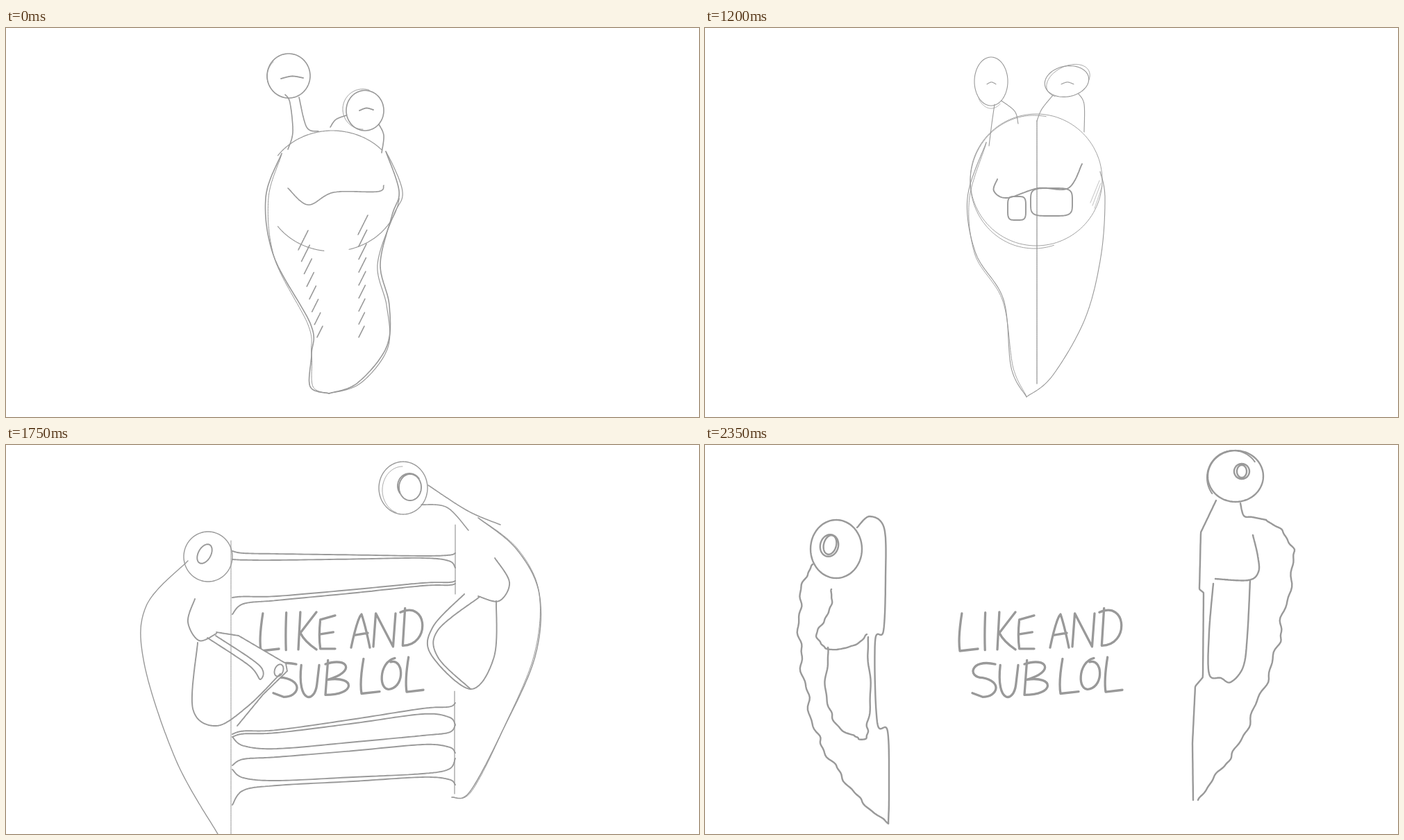
Animation, 998 px wide and 561 px high, one loop 2400 ms. Source, as an HTML page:

```html
<!DOCTYPE html>
<html lang="en">
<head>
<meta charset="utf-8">
<title>Slug sketch</title>
<style>
html, body { margin: 0; width: 100%; height: 100%; overflow: hidden; background: #fff; }
svg { display: block; width: 100vw; height: 100vh; }
g { fill: none; stroke: #999; stroke-linecap: round; stroke-linejoin: round; }
#words path { vector-effect: non-scaling-stroke; }
</style>
</head>
<body>
<svg viewBox="0 0 998 561" role="img" aria-label="LIKE AND SUB LOL">
  <clipPath id="gap"><rect y="0" height="561"/></clipPath>
  <g clip-path="url(#gap)"><g id="words" stroke-width="3.3"></g></g>
  <g id="slug"></g>
</svg>
<script>
const SAMPLES = 120, CENTER = 485, HALF_GAP = 161, TAU = 2 * Math.PI;
const lerp = (a, b, k) => a + (b - a) * k;
const range = n => Array.from({ length: n }, (_, i) => i);

// A stroke is a list of pieces, each sampled evenly so that poses can be blended.
const sample = f => range(SAMPLES + 1).map(i => f(i / SAMPLES));
const mapStroke = (stroke, f) => stroke.map(piece => piece.map((p, i) => f(p, i / SAMPLES)));
const ink = (width, stroke) => Object.assign([...stroke], { width });

function spans(coords, between) {
  const n = coords.length / 2;
  const at = i => coords.slice(2 * Math.min(n - 1, Math.max(0, i))).slice(0, 2);
  return [sample(s => {
    const u = s * (n - 1), i = Math.min(n - 2, Math.floor(u));
    return [0, 1].map(d => between(u - i, ...[-1, 0, 1, 2].map(o => at(i + o)[d])));
  })];
}
// Catmull-Rom curve and straight-edged line through key points.
const curve = (...coords) => spans(coords, (t, a, b, c, d) =>
  b + t / 2 * (c - a + t * (2 * a - 5 * b + 4 * c - d + t * (3 * (b - c) + d - a))));
const bent = (...coords) => spans(coords, (t, a, b, c) => lerp(b, c, t));

// Angles in turns, clockwise from the right.
function arc(cx, cy, rx, ry, from = 0, to = 1, tilt = 0) {
  const c = Math.cos(tilt * TAU), s = Math.sin(tilt * TAU);
  return [sample(k => {
    const a = lerp(from, to, k) * TAU, x = rx * Math.cos(a), y = ry * Math.sin(a);
    return [cx + x * c - y * s, cy + x * s + y * c];
  })];
}
const oval = (cx, cy, rx, ry, tilt) => arc(cx, cy, rx, ry, 0, 1, tilt);
const box = (cx, cy, rx, ry) => [sample(k => [Math.cos, Math.sin].map((f, d) => {
  const v = f(k * TAU);
  return [cx, cy][d] + [rx, ry][d] * Math.sign(v) * Math.abs(v) ** .45;
}))];
const lid = (x0, y0, x1, y1) => curve(x0, y0, (x0 + x1) / 2, (y0 + y1) / 2 - 3, x1, y1);
const hatch = (n, x0, y0, x1, y1) => range(n).flatMap(i => {
  const k = i / (n - 1), x = lerp(x0, x1, k), y = lerp(y0, y1, k), r = lerp(14, 8, Math.sqrt(k));
  return bent(x + r * .5, y - r, x - r * .5, y + r);
});

// A second, slightly wandering pass over a stroke.
const retrace = (stroke, drift) => mapStroke(stroke, ([x, y], s) => [x + drift * Math.sin(3 * Math.PI * s), y]);
const ragged = (stroke, amount, waves, phase = 0) => mapStroke(stroke, ([x, y], s) => {
  const a = s * waves * TAU + phase, fade = Math.sin(Math.PI * s) ** .5;
  return [x + amount * fade * (Math.sin(a) + .5 * Math.sin(2.3 * a + 1)), y + amount * fade * .5 * Math.cos(a)];
});

function leanLeft() {
  const bodyL = curve(397,181, 374,245, 386,330, 439,428, 440,470, 438,517, 465,527);
  const bodyR = curve(465,527, 506,512, 548,460, 552,400, 539,340, 556,270, 566,235, 547,178);
  return {
    width: 1.6,
    eyeL: oval(407, 69, 31, 32), twinL: ink(1, arc(409, 70, 33, 31, .3, .62)),
    eyeR: oval(517, 119, 27, 29), twinR: ink(1, arc(514, 117, 29, 29, .25, .8)),
    lidL: ink(1.8, lid(396, 73, 428, 72)), lidR: ink(1.8, lid(509, 119, 529, 118)),
    stalkL: [...curve(402,96, 409,108, 413,150, 406,175), ...curve(422,100, 433,143, 450,149)],
    stalkR: [...curve(490,126, 475,132, 467,143), ...curve(537,139, 544,155, 541,180)],
    head: ink(1.2, [...arc(470, 235, 97, 87, .6, .88), ...arc(470, 235, 97, 87, .27, .4), ...arc(470, 235, 97, 87, .02, .21)]),
    mouth: curve(406,231, 435,255, 472,237, 535,236, 544,227),
    bodyL, bodyR,
    againL: ink(1, retrace(bodyL, 4)), againR: ink(1.2, retrace(bodyR, 5)),
    hatchL: hatch(8, 428, 306, 452, 438), hatchR: hatch(9, 514, 284, 512, 438)
  };
}

function leanRight() {
  const bodyL = curve(375,225, 369,295, 390,365, 415,405, 436,475, 457,525, 468,531);
  const bodyR = curve(468,531, 505,508, 540,452, 571,370, 573,310, 562,262, 573,215, 563,179);
  return {
    width: 1.7,
    eyeL: ink(1.5, oval(429, 121, 31, 32)), twinL: ink(1, arc(421, 125, 32, 33, .3, .7)),
    eyeR: ink(1.4, oval(515, 63, 29, 31)), twinR: ink(1, arc(521, 61, 30, 30, .7, 1.15)),
    lidL: ink(1.8, lid(415, 130, 438, 122)), lidR: ink(1.8, lid(502, 67, 527, 66)),
    stalkL: [...curve(405,146, 396,158, 394,177), ...curve(466,117, 473,119, 477,131)],
    stalkR: [...curve(501,92, 500,113, 490,130), ...curve(525,92, 517,115, 526,151)],
    head: ink(1.4, [...arc(477, 230, 96, 95, .57, .87), ...arc(477, 230, 96, 95, .22, .53), ...arc(477, 230, 96, 95, 0, .18)]),
    mouth: curve(409,221, 430,251, 470,239, 524,235, 542,206),
    bodyL, bodyR,
    againL: ink(1.3, retrace(bodyL, 4)), againR: ink(.8, retrace(bodyR, 1)),
    hatchL: hatch(7, 428, 299, 434, 414), hatchR: hatch(6, 535, 279, 519, 398)
  };
}

function squash() {
  const bodyL = curve(405,165, 378,245, 390,325, 430,392, 441,490, 463,532);
  return {
    width: 1.1,
    eyeL: oval(412, 77, 24, 35), twinL: ink(.8, arc(412, 82, 22, 34, .15, .4)),
    eyeR: oval(521, 77, 32, 22, -.03), twinR: ink(.9, arc(523, 76, 33, 21, .4, 1.1, -.07)),
    lidL: lid(406, 81, 419, 81), lidR: lid(513, 81, 531, 81),
    stalkL: [...curve(417,110, 413,138, 409,170), ...curve(427,105, 446,120, 451,138)],
    stalkR: [...curve(501,97, 485,117, 478,134), ...curve(538,95, 546,110, 546,150)],
    head: ink(.9, [...oval(477, 219, 95, 95), ...arc(474, 222, 92, 96, .2, .78)]),
    shade: ink(.7, range(3).flatMap(i => bent(555 + 3 * i, 252 + 4 * i, 568 + 2 * i, 220 + 4 * i))),
    bodyL, againL: ink(.9, retrace(bodyL, 3)),
    bodyR: curve(569,207, 576,245, 570,330, 547,420, 500,502, 463,532),
    mid: ink(.8, bent(478,134, 478,513)),
    mouth: ink(1.9, curve(421,218, 416,235, 435,245, 480,231, 523,231, 543,196)),
    teeth: ink(1.9, [...box(449, 260, 13, 17), ...box(499, 251, 30, 20)])
  };
}

function melt() {
  return {
    width: 2.3,
    eyeL: oval(413, 170, 28, 37, .02), twinL: ink(1.5, arc(409, 170, 23, 34, .3, .75)),
    pupL: ink(2, [...oval(412, 169, 13, 20, .02), ...arc(408, 169, 14, 19, .3, .7)]),
    eyeR: oval(509, 41, 32, 33),
    pupR: ink(1.9, [...oval(514, 40, 18, 24), ...oval(513, 41, 14, 20)]),
    bump: bent(437,137, 450,128, 464,134, 468,155, 475,163, 481,157, 481,127, 498,125),
    stalkR: [...ragged(curve(496,77, 501,100, 498,125), 3, 2), ...ragged(curve(520,77, 518,105, 533,140), 3, 2)],
    bodyL: ragged(curve(398,207, 385,250, 388,310, 402,385, 430,480, 477,560), 2, 6),
    bodyR: ragged(curve(530,135, 571,205, 573,280, 566,345, 530,455, 486,518), 2.5, 6),
    mid: ink(1.8, [...bent(481,160, 480,225), ...bent(483,467, 482,553, 477,560)]),
    mouthL: ink(1.8, curve(425,231, 413,255, 430,276)),
    toothL: curve(425,265, 418,310, 427,380, 445,401, 456,385, 456,310, 450,282, 440,317, 431,278),
    mouthR: curve(533,165, 550,195, 540,230, 505,229, 483,228),
    toothR: bent(531,232, 522,250, 526,320, 506,335, 496,352, 482,338, 480,389, 466,389, 463,283, 482,287, 482,222),
    drip: curve(484,230, 494,233, 499,295, 502,231)
  };
}

// One edge of a sticky strand that flares where it meets either half.
const strand = (yL, yR, flareL, flareR) => curve(
  326, yL + flareL, 342, yL + flareL * .25, 390, yL, 500, (yL + yR) / 2, 600, yR, 638, yR + flareR * .3, 647, yR + flareR);

function torn() {
  const bodyR = curve(680,105, 735,150, 768,215, 762,305, 716,410, 668,500, 642,508);
  return {
    width: 1.9,
    tip: bent(303,270, 335,275, 403,315, 405,326, 370,360, 333,405),
    fold: [...curve(290,278, 350,318, 366,338, 365,318, 302,275), ...oval(393, 325, 6, 9, .06)],
    eyeL: ink(1.4, oval(291, 161, 35, 36)), pupL: oval(286, 157, 9, 15, .08),
    bodyL: ink(1.4, curve(262,167, 202,232, 199,315, 245,455, 305,561)),
    innerL: ink(1, bent(324,138, 324,561)),
    mouthL: curve(272,222, 262,255, 278,282, 303,272),
    toothL: curve(276,285, 269,380, 303,405, 348,377, 395,330),
    strands: [
      ...strand(157, 160, -4, -4), ...strand(166, 163, -1, 14),
      ...strand(218, 199, 2, -3), ...strand(224, 203, 20, -3),
      ...strand(411, 380, 6, -8), ...strand(415, 388, 6, 15), ...strand(438, 419, -17, -15),
      ...strand(450, 432, 12, 12), ...strand(484, 474, -16, -22), ...strand(491, 479, 28, 11)
    ],
    eyeR: ink(1.4, oval(572, 62, 35, 38)), twinR: ink(.9, arc(571, 65, 29, 34, .3, .75)),
    pupR: [...oval(582, 61, 16, 19), ...arc(581, 59, 17, 18, .4, .9)],
    stalkR: ink(1.6, [...curve(608,58, 665,95, 712,115), ...curve(598,86, 635,90, 666,123)]),
    bodyR: ink(1.5, bodyR), againR: ink(1, retrace(bodyR, 2)),
    innerR: ink(1.2, [...bent(647,115, 647,215), ...bent(646,355, 646,503)]),
    mouthR: curve(704,163, 725,198, 710,225, 680,218),
    toothR: curve(706,225, 703,305, 669,352, 612,302, 615,262, 660,215),
    lipR: curve(682,219, 622,267, 622,306, 669,352)
  };
}

// The separated halves; slump runs from freshly settled (0) to dripping (1).
function halves(slump) {
  const s = slump, phase = 4 * s, amount = lerp(1.7, 2.7, s);
  return {
    width: lerp(2.9, 2.4, s),
    eyeL: oval(187 + 2 * s, 153 - 3 * s, 37, 42),
    pupL: [...oval(183 - 4 * s, 152 - 7 * s, 13, 16, .04), ...oval(183 - 3 * s, 152 - 8 * s, 13 - 4 * s, 16 - 2 * s, .04)],
    innerL: curve(219,119, 237,103, 258,120, 260,190, 257,268, 245,283, 248,400, 263,413, 265,500, 264,546),
    bodyL: ragged(curve(168 - 13 * s,188 - 16 * s, 147 - 8 * s,208, 136,275, 144,345, 161,418, 190,467, 225,513, 264,546), amount, 8, phase),
    mouthL: ragged(curve(182,208, 180,238, 162,270, 174,293, 213,290, 233,273), 1.5, 5, phase),
    toothL: ragged(curve(177,292, 178,382, 218,417 + 5 * s, 236,402, 235,277), 2.5 * s, 5),
    eyeR: oval(759 + 5 * s, 53 - 8 * s, 34 + 6 * s, 34 + 3 * s),
    twinR: ink(2, arc(759 + 2 * s, 53 - 6 * s, 34 + 4 * s, 34 + 5 * s, .4, .9)),
    pupR: [...oval(770 + 3 * s, 50 - 12 * s, 13 - 2 * s, 14 - 3 * s), ...oval(770 + 3 * s, 51 - 13 * s, 11 - 4 * s, 11 - 2 * s)],
    innerR: bent(736,80, 714,126, 712,208, 718,213, 717,335, 706,348, 702,430, 703,512),
    stalkR: curve(771,84, 776,102, 788,104, 808,100 + 8 * s),
    bodyR: ragged(curve(808,100 + 8 * s, 836,130, 848,170, 833,245, 822,300, 796,370, 767,435, 738,474, 710,512), amount, 8, phase),
    mouthR: curve(789,130, 796,160, 797,183, 782,195, 735,193),
    toothR: curve(779 + 6 * s,195, 781,275, 775,320, 757,342, 743,318 + 18 * s, 726,338 - 8 * s, 726,270, 732,200)
  };
}

const pick = (stroke, i) => stroke[Math.min(i, stroke.length - 1)];
const blend = (a, b, k) => ink(lerp(a.width, b.width, k), range(Math.max(a.length, b.length)).map(i =>
  pick(a, i).map((p, j) => p.map((v, d) => lerp(v, pick(b, i)[j][d], k)))));
const inked = ({ width, ...strokes }) => Object.fromEntries(
  Object.entries(strokes).map(([name, stroke]) => [name, ink(stroke.width || width, stroke)]));
const toPath = stroke => stroke.map(piece => 'M' + piece.map(p => p.map(v => v.toFixed(1)).join(' ')).join('L')).join('');

const slug = document.getElementById('slug');
const words = document.getElementById('words');
const gap = document.querySelector('#gap rect');

// Matching strokes blend; the others swap partway. Tearing stretches new ones out of the centre.
function drawSlug(from, to, k, { warp = p => p, tearing = false } = {}) {
  const a = inked(from), b = inked(to);
  const names = new Set([...Object.keys(b), ...Object.keys(a)]);
  slug.innerHTML = [...names].map(name => {
    const both = a[name] && b[name];
    let stroke = both ? blend(a[name], b[name], k) : k < .45 ? a[name] : b[name];
    if (!stroke) return '';
    const { width } = stroke;
    if (tearing && !a[name]) stroke = mapStroke(stroke, ([x, y]) => [lerp(CENTER, x, k), y]);
    const fill = name === 'tip' ? '#fff' : 'none';
    return `<path d="${toPath(mapStroke(stroke, p => warp(p, name)))}" stroke-width="${width}" fill="${fill}"/>`;
  }).join('');
}

// Letters on a 9 by 9 grid.
const glyphs = {
  L: 'M1 0Q-1 6 0 9L9 8.5', I: 'M6 0Q3 5 5 9', K: 'M1 0L0 9M9 0L1 5Q3 7 9 9',
  E: 'M9 1L1 2Q0 6 1 9L9 9M1 5.5L8 5', A: 'M0 9Q3 2 5 1Q7 4 9 9M2 6L8 5.5',
  N: 'M0 9L1 1L8 9L9 1', D: 'M2 0L1 9M0 1C12 -2 13 9 1 9',
  S: 'M9 .5C-1 -1 -2 4 4 4C12 5 10 9 4 9L0 8', U: 'M1 1C-1 11 7 11 8 6L9 1',
  B: 'M1 0L0 9M0 1C9 -1 12 3 1 5C12 4 12 9 0 9', O: 'M6 0C-2 1 -2 9 4 8C11 7 10 0 4 1'
};
// Each letter is followed by its left edge and width.
const rows = [
  { y: 243, height: 54, text: 'L367:26 I401:4 K421:26 E450:24 A497:27 N529:32 D568:30' },
  { y: 314, height: 50, text: 'S385:33 U422:29 B460:33 L512:26 O542:27 L577:24' }
];
words.innerHTML = rows.flatMap(({ y, height, text }) => text.split(' ').map(item => {
  const [x, w] = item.slice(1).split(':').map(Number), rise = (x - 367) * .038;
  return `<path d="${glyphs[item[0]]}" transform="translate(${x} ${y - rise}) scale(${w / 9} ${height / 9})"/>`;
})).join('');

function showWords(half) {
  words.style.display = half > 30 ? '' : 'none';
  gap.setAttribute('x', CENTER - half);
  gap.setAttribute('width', 2 * half);
}

// Start of the held drawing that is visible at time t.
function hold(t) {
  if (t < 1200) {
    const u = t % 600;
    return t - u + (u < 200 ? 0 : u < 400 ? Math.floor(u / 100) * 100 : 400);
  }
  return t < 1300 ? 1200 : Math.floor(t / 50) * 50;
}

function draw(t) {
  const tear = Math.max(0, (t - 1550) / 200) ** 2.5;
  showWords(t > 1750 ? 500 : HALF_GAP * tear);
  if (t < 1200) {
    const k = Math.max(0, t % 600 - 100) / 300, stretch = 1 + .1 * k * (1 - k);
    drawSlug(leanLeft(), leanRight(), k, { warp: ([x, y]) => [x, 285 + (y - 285) * stretch] });
  } else if (t < 1550) {
    const s = Math.max(0, (t - 1250) / 300);
    drawSlug(squash(), melt(), s * s * (3 - 2 * s));
  } else if (t <= 1750) {
    drawSlug(melt(), torn(), tear, { tearing: true });
  } else if (t < 2100) {
    const s = (t - 1850) / 50;
    const swing = s < 0 ? 0 : Math.exp(-s / 2) * Math.cos(s * .3 * Math.PI);
    const warp = ([x, y], name) => [x + swing * (name.endsWith('L') ? -27 : 86), y];
    drawSlug(torn(), halves(0), s < 0 ? .75 : 1, { warp });
  } else {
    const pose = halves((t - 2100) / 250);
    drawSlug(pose, pose, 0);
  }
}

let shown = -1;
function tick() {
  const t = hold(performance.now() % 2400);
  if (t !== shown) draw(shown = t);
  requestAnimationFrame(tick);
}
tick();
</script>
</body>
</html>
```
